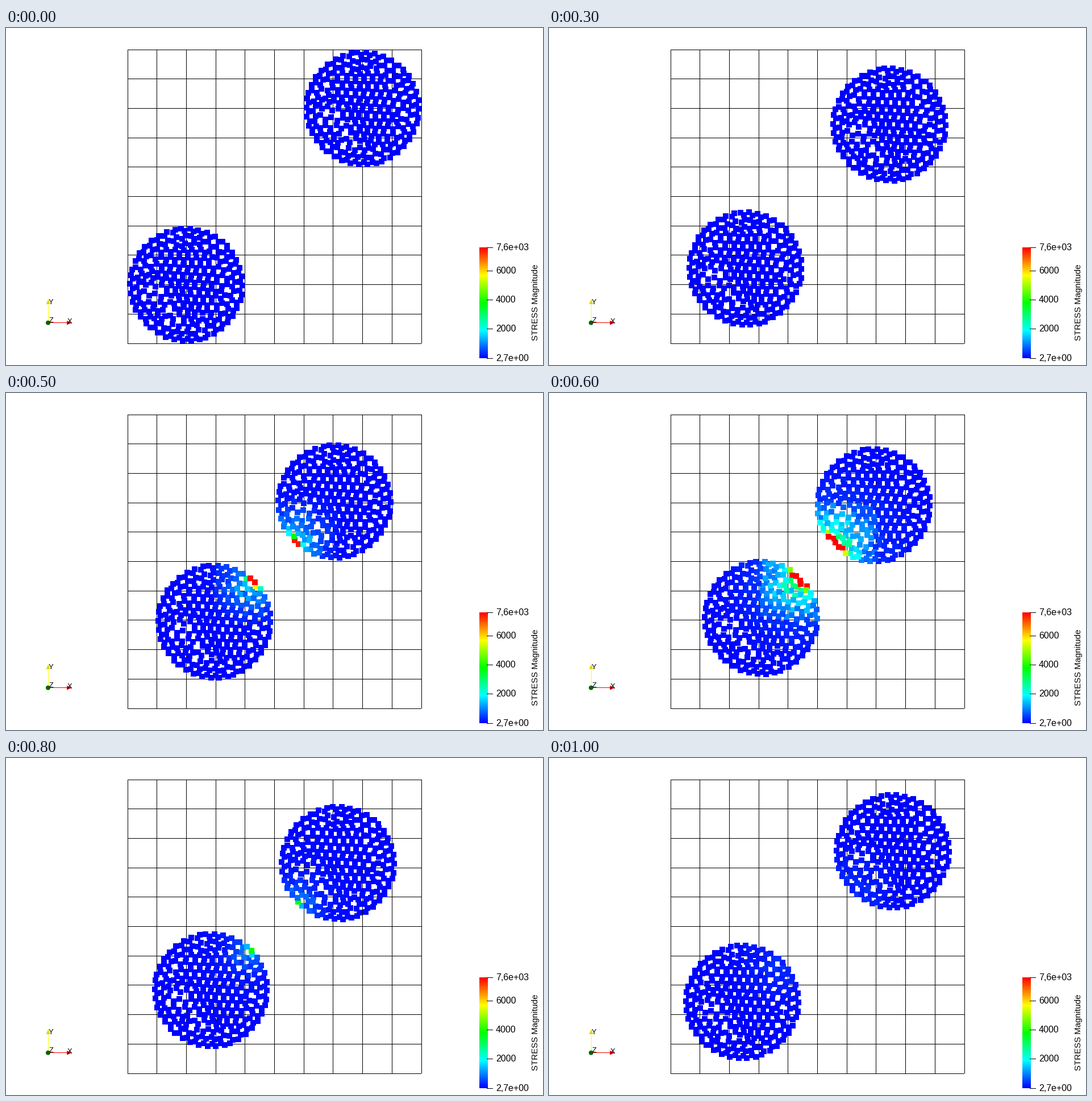
These frames come from a looping animation (945x593 px, 1100 ms). A matplotlib script:

```python
import matplotlib.pyplot as plt
import numpy as np
from matplotlib.animation import FuncAnimation
from matplotlib.collections import PolyCollection
from matplotlib.colors import hsv_to_rgb
from matplotlib.patches import Circle, Polygon, Rectangle
from matplotlib.tri import Triangulation

W, H, DPI = 945, 593, 64
PX = 72 / DPI
FRAMES = 11
RADIUS, EDGES = 103.4, 42
LEFT, TOP, CELL = 214, 38, 51.7
VMAX = 7600
SIDE = 10

# Distance travelled by each disk along both axes, in pixels.
TRAVEL = [0, 8.2, 18.3, 28.5, 39, 49.3, 56, 53, 43.3, 33, 22.6]

# step: (peak, peak width, peak depth, spread, spread radius, glow, dent)
IMPACT = {
    5: (6500, 15, 6.3, 1250, 50, 80, 0),
    6: (13000, 23, 8, 1900, 62, 450, 4),
    7: (7500, 18, 7, 1500, 60, 400, 2.5),
    8: (3200, 7, 4.5, 750, 34, 120, 0),
    9: (0, 10, 5, 350, 45, 90, 0),
    10: (0, 10, 5, 220, 60, 70, 0),
}
CALM = (0, 10, 5, 0, 50, 0, 0)

rng = np.random.default_rng(4)


def ring(radius, count, phase=0.5):
    a = 2 * np.pi * (np.arange(count) + phase) / count
    return radius * np.column_stack([np.cos(a), np.sin(a)])


def hex_core(radius, step, tilt):
    i, j = np.meshgrid(np.arange(-9, 10), np.arange(-9, 10))
    x = (i + 0.5 * (j % 2)).ravel() * step + 8
    y = j.ravel() * step * np.sqrt(3) / 2
    c, s = np.cos(tilt), np.sin(tilt)
    pts = np.column_stack([c * x - s * y, s * x + c * y])
    return pts[np.hypot(*pts.T) < radius]


def disk_particles():
    """Centroids of an unstructured triangle mesh filling the disk."""
    pts = np.vstack([ring(RADIUS, EDGES), ring(90, 36, 0.2),
                     ring(77, 30, 0.7), hex_core(67, 14.9, 0.04)])
    pts[EDGES:] += rng.normal(0, 1.4, pts[EDGES:].shape)
    a, b = Triangulation(*pts.T).edges.T
    total, degree = np.zeros_like(pts), np.zeros(len(pts))
    for p, q in ((a, b), (b, a)):
        np.add.at(total, p, pts[q])
        np.add.at(degree, p, 1)
    mean = total / degree[:, None]
    pts[EDGES:] += 0.5 * (mean - pts)[EDGES:]
    # Coarser spots left and below the middle.
    for spot in ((-48, 12), (-66, 6), (-30, 46), (-14, 62)):
        d = pts - spot
        dist = np.hypot(*d.T)
        near = dist.argmin()
        push = 6 * np.exp(-(dist / 22) ** 2) / np.maximum(dist, 1)
        push[:EDGES] = 0
        pts = pts + d * push[:, None]
        pts[near] = spot
    mesh = Triangulation(*pts.T)
    return pts[mesh.triangles].mean(axis=1)


PARTICLES = disk_particles()
NOISE = rng.uniform(0.65, 1.35, len(PARTICLES))


def rainbow(t):
    t = np.clip(t, 0, 1)
    one = np.ones_like(t)
    return hsv_to_rgb(np.stack([(1 - t) * 2 / 3, one, one], axis=-1))


def disk_state(step, side):
    """Positions relative to the centre and stress; side is +1 or -1."""
    peak, width, reach, spread, size, glow, dent = IMPACT.get(step, CALM)
    x, y = PARTICLES.T * side
    depth = 98.7 - (y - x) / np.sqrt(2)
    lat = (x + y) / np.sqrt(2)
    dist = np.hypot(depth, lat)

    # Background grid cells bound the loaded zone.
    cell = np.where((x < 3) & (y > -3), 1, 0.2)
    stress = peak * np.exp(-(lat / width) ** 4 - (depth / reach) ** 2)
    stress += spread * cell * NOISE * np.exp(-(dist / size) ** 2)
    stress += glow * NOISE * np.exp(-(dist / 110) ** 2)

    inward = dent * np.exp(-(lat / 16) ** 2 - np.maximum(depth, 0) / 25)
    shift = inward[:, None] * np.array([1, -1]) / np.sqrt(2)
    return PARTICLES + side * shift, stress


def squares(centres):
    lo = np.round(centres - SIDE / 2)
    corners = np.array([(0, 0), (SIDE, 0), (SIDE, SIDE), (0, SIDE)])
    return lo[:, None, :] + corners


fig = plt.figure(figsize=(W / DPI, H / DPI), dpi=DPI, facecolor="white")
ax = fig.add_axes([0, 0, 1, 1])
ax.axis("off")


def bar(x, y, w, h, color="black", z=1):
    ax.add_patch(Rectangle((x, y), w, h, fc=color, lw=0, zorder=z))


def label(x, y, text, size, **kw):
    ax.text(x, y, text, fontsize=size * PX, family="Liberation Sans",
            color="black", zorder=6, **kw)


def draw_grid():
    span = 10 * CELL
    for k in range(11):
        bar(np.floor(LEFT + CELL * k), TOP, 1, span)
        bar(LEFT, np.floor(TOP + CELL * k), span, 1)


def draw_scale():
    strip = rainbow(np.linspace(1, 0, 195))[:, None, :]
    ax.imshow(strip, extent=(833, 848, 581, 386), aspect="auto",
              interpolation="nearest", zorder=2)
    ticks = [(VMAX, "7,6e+03"), (6000, "6000"), (4000, "4000"),
             (2000, "2000"), (0, "2,7e+00")]
    for value, text in ticks:
        y = np.floor(581 - 195 * value / VMAX)
        bar(846, y, 11, 1, z=3)
        label(862, y + 5, text, 16, va="baseline")
    label(932, 483, "STRESS Magnitude", 15, rotation=90,
          ha="center", va="center")


def draw_triad():
    bar(74, 487, 1, 28, "#ffff00")
    bar(78, 518, 30, 1, "#f00000")
    ax.add_patch(Polygon([(107, 515), (107, 522.5), (116, 518.7)],
                         fc="#dc0000", lw=0, zorder=3))
    ax.add_patch(Polygon([(70.5, 486), (78, 486), (74.3, 477.5)],
                         fc="#e0d800", lw=0, zorder=3))
    ax.add_patch(Circle((74, 518.7), 4, fc="#006400", lw=0, zorder=3))
    for x, y, name in ((112.5, 519.5, "X"), (79.5, 486.5, "Y"),
                       (80, 518.5, "Z")):
        label(x, y, name, 13, ha="center", va="baseline")


draw_grid()
draw_scale()
draw_triad()
ax.set_xlim(0, W)
ax.set_ylim(H, 0)

disks = []
for col, row, side in ((8, 2, 1), (2, 8, -1)):
    cloud = PolyCollection([], linewidths=0, antialiaseds=False, zorder=4)
    ax.add_collection(cloud, autolim=False)
    start = np.array([LEFT + col * CELL, TOP + row * CELL])
    disks.append((cloud, start, side))


def update(step):
    for cloud, start, side in disks:
        rel, stress = disk_state(step, side)
        centre = start + side * TRAVEL[step] * np.array([-1, 1])
        cloud.set_verts(squares(centre + rel))
        cloud.set_facecolor(rainbow(stress / VMAX))
    return [d[0] for d in disks]


anim = FuncAnimation(fig, update, frames=FRAMES, interval=100,
                     repeat=True, repeat_delay=0, blit=False)
plt.show()
```
